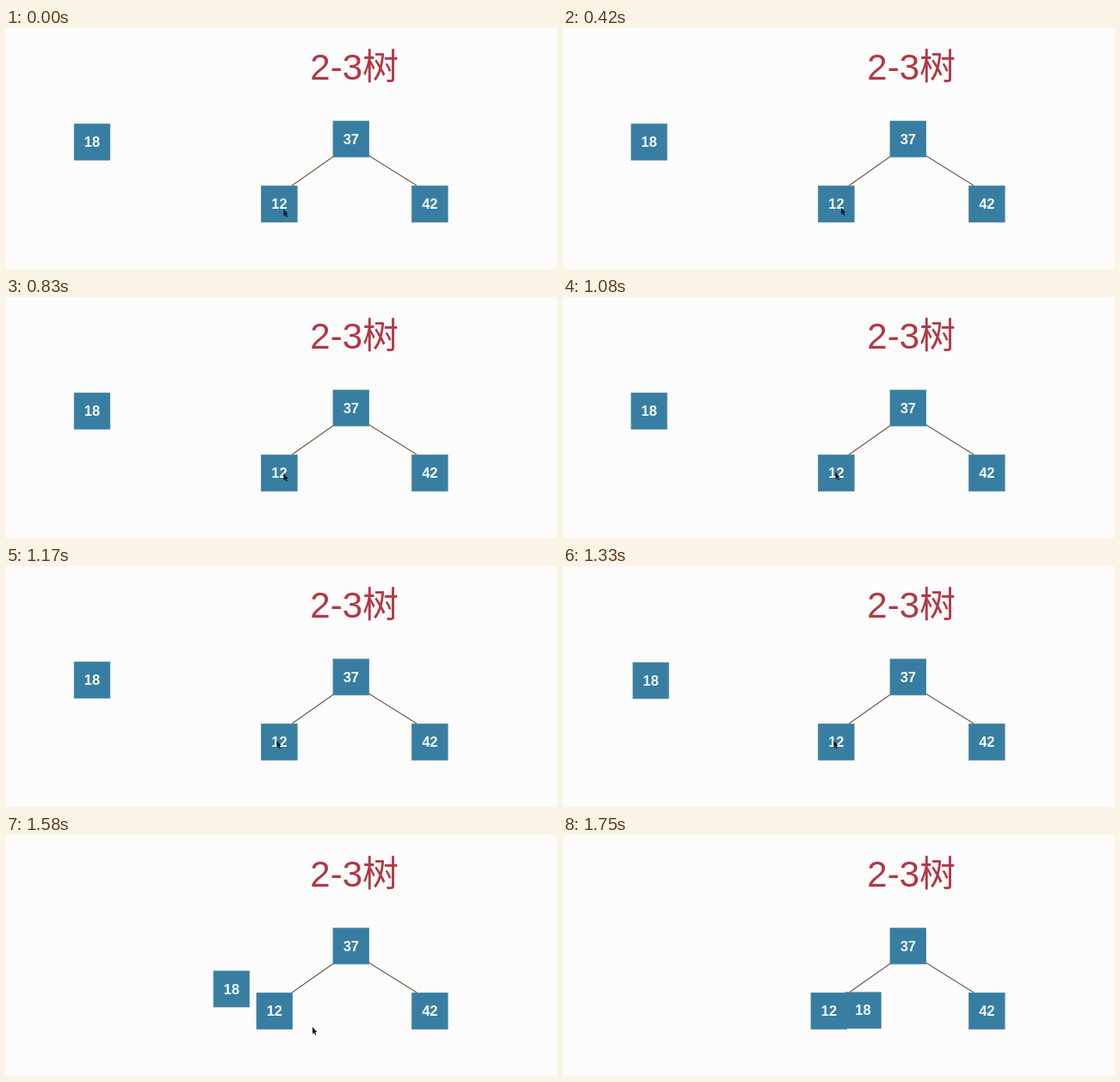
Animation of 640 by 280 pixels, one loop 1830 ms. Source, as an HTML page:

```html
<!DOCTYPE html>
<html lang="zh">
<head>
<meta charset="utf-8">
<title>2-3树</title>
<style>
html, body { margin: 0; width: 100%; height: 100%; overflow: hidden; background: #fdfcfd; }
svg { display: block; width: 640px; height: 280px; }
.title { font: 42px "Liberation Sans", "Noto Sans CJK SC", "Noto Sans CJK", sans-serif; fill: #b03945; }
.node rect { fill: #377ea2; stroke: #4d8494; stroke-width: .8; }
.node text { font: bold 16.5px "Liberation Sans", sans-serif; fill: #f5faf4; text-anchor: middle; }
.edge { stroke: #6c6044; stroke-width: 1.2; }
</style>
</head>
<body>
<svg viewBox="0 0 640 280">
  <text class="title" x="353.3" y="60.4">2-3树</text>
  <path class="edge" d="M381 148.7L332 183.2M421 148L477 183"/>
  <g id="nodes"></g>
  <path id="cursor" d="M0 0V8L1.8 6.5L3.2 9.4L4.4 8.8L3.2 6H5.3Z" fill="#12161c"/>
</svg>
<script>
const LOOP = 1830, STEP = 1000 / 12, LAST = 21;
const NS = "http://www.w3.org/2000/svg";

// Progress of the merge, one value per step from MERGE on
const MERGE = 15;
const ease = [0, .008, .12, .333, .645, .88, .99];

// Pointer stops: step, x, y
const stops = [[0, 322.5, 210.5], [5, 323, 208.5], [10, 322.5, 205],
  [14, 314.5, 203], [16, 314.5, 203], [18, 350.5, 219.5], [19, 356, 223]];
const POINTER_END = 20;

function add(parent, tag, attrs) {
  const el = document.createElementNS(NS, tag);
  for (const key in attrs) el.setAttribute(key, attrs[key]);
  return parent.appendChild(el);
}

function place(el, x, y) {
  el.setAttribute("transform", `translate(${x} ${y})`);
}

function node(label, x, y) {
  const g = add(document.getElementById("nodes"), "g", { class: "node" });
  add(g, "rect", { x: -20.8, y: -20.9, width: 41.6, height: 41.8 });
  add(g, "text", { y: 5.6 }).textContent = label;
  place(g, x, y);
  return g;
}

node(37, 400.8, 129);
node(42, 492.3, 204.5);
const left = node(12, 317.4, 204.5);
const moving = node(18, 100, 132.5);
const cursor = document.getElementById("cursor");

function pointerAt(step) {
  let i = 1;
  while (i < stops.length - 1 && stops[i][0] < step) i++;
  const [s0, x0, y0] = stops[i - 1], [s1, x1, y1] = stops[i];
  const p = Math.min(1, (step - s0) / (s1 - s0));
  return [x0 + (x1 - x0) * p, y0 + (y1 - y0) * p];
}

function draw(now) {
  const step = Math.min(LAST, Math.floor((now % LOOP + 8) / STEP));
  const p = ease[Math.max(0, step - MERGE)];
  place(left, 317.4 - 8.6 * p, 204.5);
  place(moving, 100 + 251 * p, 132.5 + 72 * p);
  place(cursor, ...pointerAt(step));
  cursor.style.display = step < POINTER_END ? "" : "none";
}

const start = performance.now();
function tick() {
  draw(performance.now() - start);
  requestAnimationFrame(tick);
}
tick();
</script>
</body>
</html>
```
